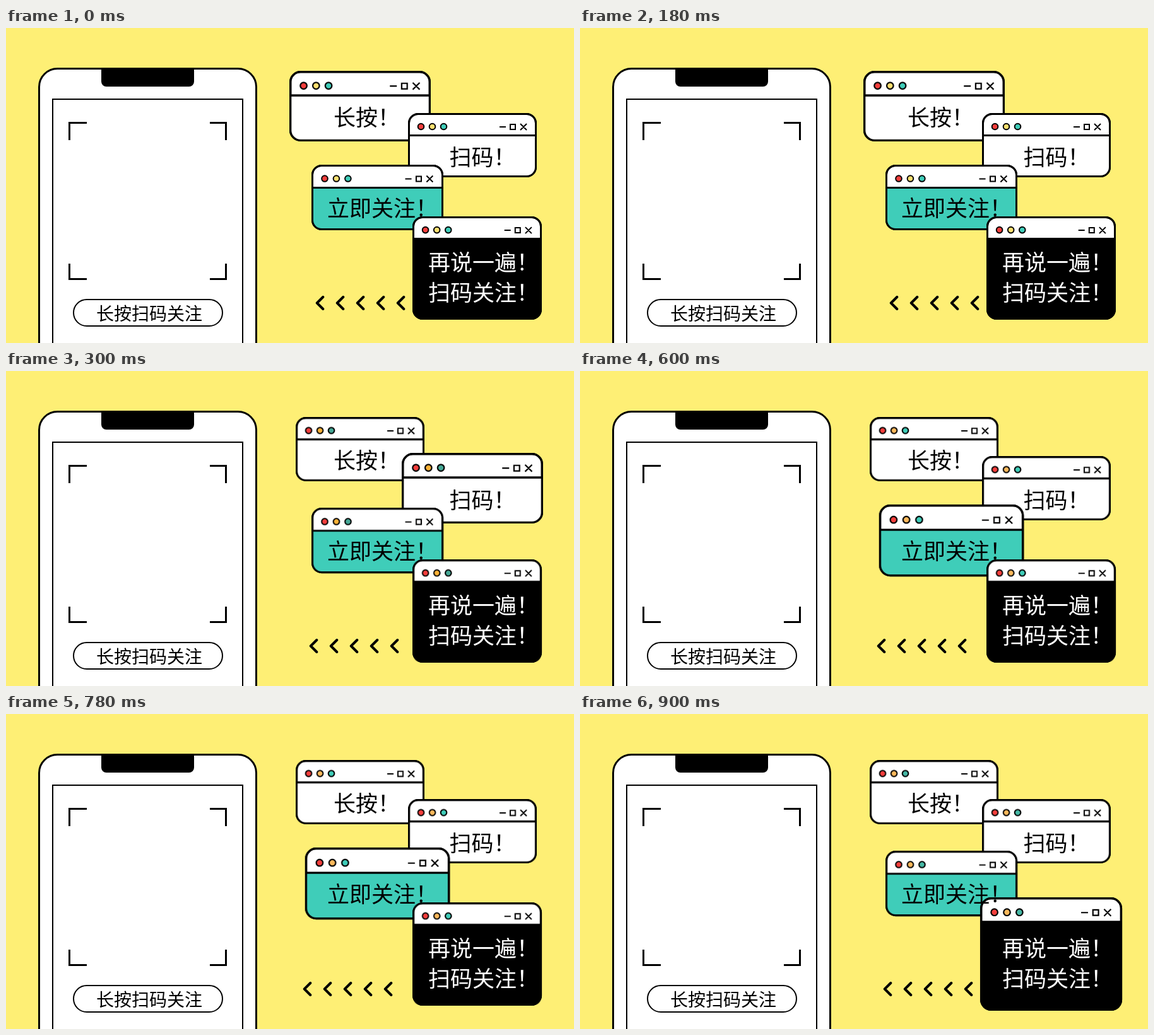
These frames come from a looping animation (900 by 500 pixels, 1.2 s). An HTML page:

```html
<!DOCTYPE html>
<html lang="zh-CN">
<head>
<meta charset="utf-8">
<title>长按扫码关注</title>
<style>
  html, body { margin: 0; width: 100%; height: 100%; overflow: hidden; background: #feef75; }
  svg { display: block; width: 900px; height: 500px; }
  text { font: 400 35px "Noto Sans CJK SC", "Noto Sans CJK", sans-serif; }
  .line { fill: none; stroke: #000; stroke-width: 3; }
  .thin { stroke-width: 2; }
  .paper { fill: #fff; }
  .dot { stroke: #000; stroke-width: 2; }
  .red { fill: #f43f3d; }
  .amber { fill: #fee070; animation: amber 1.2s step-end infinite; }
  .green { fill: #3fcdb9; animation: green 1.2s step-end infinite; }
  .window {
    transform-box: fill-box;
    transform-origin: center;
    animation: pop 1.2s step-end calc(var(--turn) * 300ms - 1200ms) infinite;
  }
  .arrows {
    fill: none; stroke: #000; stroke-width: 4;
    stroke-linecap: round; stroke-linejoin: round;
    animation: march 1.2s step-end infinite;
  }
  @keyframes pop { 0% { transform: scale(1.098); } 25%, 100% { transform: none; } }
  @keyframes march {
    0%, 100% { transform: none; }
    25%, 75% { transform: translateX(-10px); }
    50% { transform: translateX(-20px); }
  }
  @keyframes amber { 0%, 100% { fill: #fee070; } 25% { fill: #fbb237; } 50%, 75% { fill: #fbb95c; } }
  @keyframes green { 0%, 50%, 100% { fill: #3fcdb9; } 25% { fill: #45a896; } 75% { fill: #45b8a5; } }
</style>
</head>
<body>
<svg viewBox="0 0 900 500">
  <rect width="900" height="500" fill="#feef75"/>

  <g id="phone">
    <rect class="line paper" x="52.5" y="64.5" width="344" height="500" rx="29"/>
    <path d="M151 64H298V85a8 8 0 0 1-8 8H159a8 8 0 0 1-8-8z"/>
    <rect class="line thin" x="74" y="113" width="301" height="450"/>
    <path class="line" d="M100.5 178V150.5H128M323 150.5H348.5V178M100.5 374V398.5H128M323 398.5H348.5V374"/>
    <rect class="line thin" x="107" y="431" width="236" height="42" rx="21"/>
    <text x="143" y="464" style="font-size:28px">长按扫码关注</text>
  </g>

  <g class="arrows" id="arrows"></g>
  <g id="windows"></g>
  <g id="words"></g>
</svg>
<script>
  const windows = [
    { x: 459, y: 73, w: 204, h: 102, bar: 35.5, body: '#fff' },
    { x: 637, y: 135, w: 204, h: 102, bar: 35.5, body: '#fff' },
    { x: 484, y: 217, w: 209, h: 104, bar: 36.5, body: '#3fcdb9' },
    { x: 644, y: 299, w: 205, h: 164, bar: 35.5, body: '#000' }
  ];
  const words = [
    [519, 155, '#000', '长按！'],
    [702.5, 218, '#000', '扫码！'],
    [509, 298.5, '#000', '立即关注！'],
    [669, 385, '#fff', '再说一遍！'],
    [669, 433, '#fff', '扫码关注！']
  ];

  const dot = (color, x, y) => `<circle class="dot ${color}" cx="${x}" cy="${y}" r="4.8"/>`;

  function drawWindow({ x, y, w, h, bar, body }, turn) {
    const k = w / 204; // controls grow with the window's width
    const left = x + 1.5, right = x + w - 1.5, bottom = y + h - 1.5;
    const r = 14.5, top = y + bar, mid = y + 21.5 * k, mark = mid + 0.5;
    const fromLeft = d => x + d * k, fromRight = d => x + w - d * k;
    const frame = `<rect class="line" x="${left}" y="${y + 1.5}" width="${w - 3}" height="${h - 3}" rx="${r}"`;
    return `<g class="window" style="--turn:${turn}">
      ${frame} style="fill:#fff"/>
      <path fill="${body}" d="M${left} ${top}H${right}V${bottom - r}a${r} ${r} 0 0 1 ${-r} ${r}H${left + r}a${r} ${r} 0 0 1 ${-r} ${-r}z"/>
      ${frame}/>
      <path class="line" d="M${left} ${top}H${right}"/>
      ${dot('red', fromLeft(20.5), mid)}${dot('amber', fromLeft(38.5), mid)}${dot('green', fromLeft(56.5), mid)}
      <path class="line thin" d="M${fromRight(59)} ${mark}h10M${fromRight(42)} ${mark - 4}h8v8h-8z
        M${fromRight(26)} ${mark - 5}l10 10m0-10l-10 10"/>
    </g>`;
  }

  const fill = (id, parts) => { document.getElementById(id).innerHTML = parts.join(''); };

  fill('windows', windows.map(drawWindow));
  fill('words', words.map(([x, y, ink, line]) => `<text x="${x}" y="${y}" fill="${ink}">${line}</text>`));
  fill('arrows', Array.from({ length: 5 }, (_, i) => `<path d="M${502.3 + 32 * i} 427l-9.5 9.5l9.5 9.5"/>`));
</script>
</body>
</html>
```
